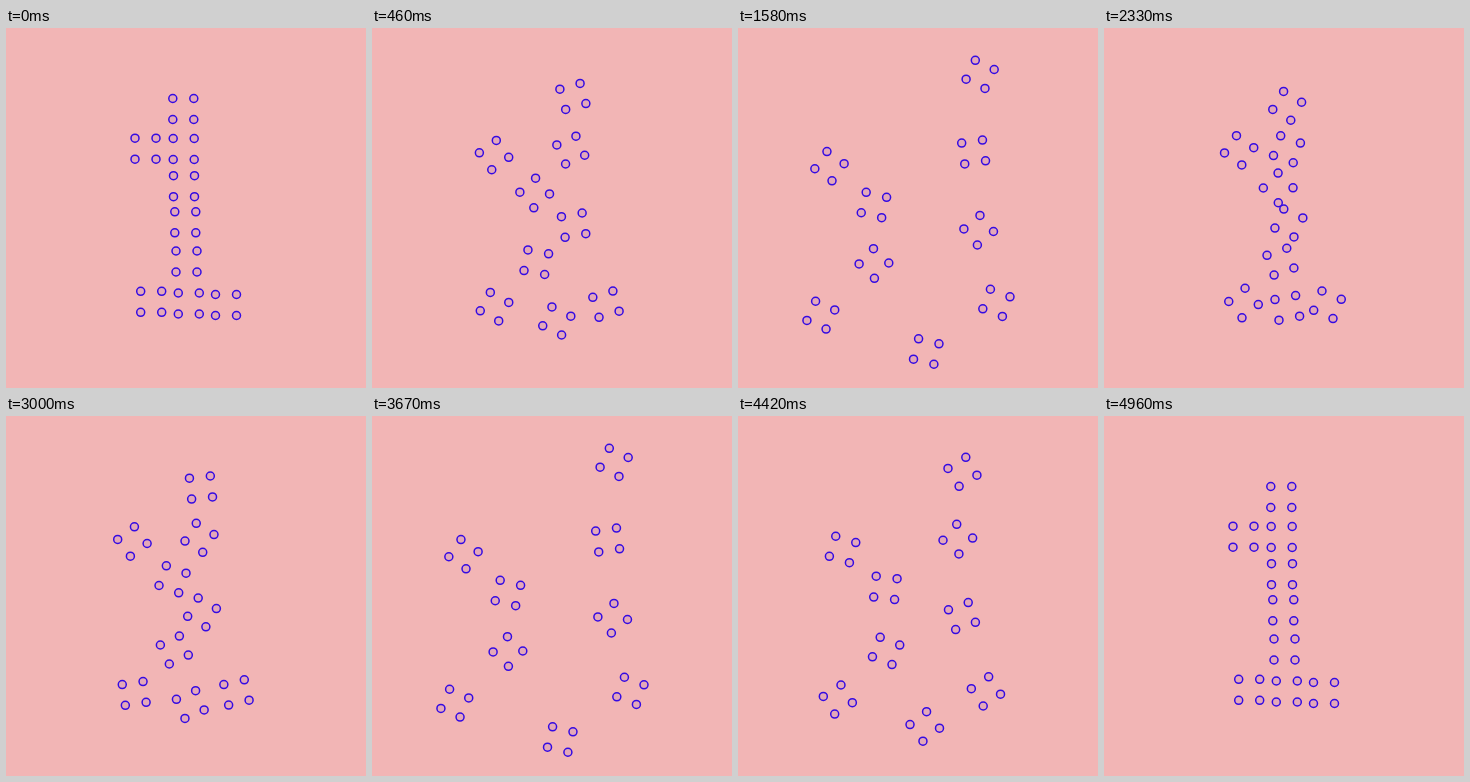
An HTML page that plays this animation: 360 by 360 pixels, repeating every 5 s.

```html
<!DOCTYPE html>
<html lang="en">
<head>
<meta charset="utf-8">
<title>Dotted one</title>
<style>
  html, body { margin: 0; width: 100%; height: 100%; overflow: hidden; background: #f2b5b5; }
  svg { display: block; width: 100vw; height: 100vh; }
  circle { fill: rgba(70, 30, 230, .08); stroke: #340ae2; stroke-width: 1.5; }
</style>
</head>
<body>
<svg id="stage" viewBox="0 0 360 360"></svg>
<script>
const LOOP = 5000;
const POSES = 30;       // the motion is drawn on six poses a second
const LEAD = 42;        // ms by which the pose clock runs ahead of the loop
const FLIGHT = 13.5;    // poses from leaving the digit to landing again
const SPEED = 0.18;     // share of the reach covered per pose
const HALF = 10.5;      // half the side of a square of four dots

// Each square: place in the digit, reach of its flight, degrees turned per pose.
const squares = [
  { x: 177.3, y: 81, dx: 65.5, dy: -35, spin: 37 },
  { x: 139.5, y: 120.7, dx: -48.5, dy: 17.7, spin: -18.1 },
  { x: 177.7, y: 121, dx: 58.5, dy: 3, spin: -12.3 },
  { x: 178, y: 158.2, dx: -42.5, dy: 19, spin: 24.2 },
  { x: 179.3, y: 194.3, dx: 62, dy: 8, spin: -5 },
  { x: 180.5, y: 233.5, dx: -45, dy: 2, spin: 5.4 },
  { x: 145.2, y: 273.8, dx: -63, dy: 13.5, spin: -30.7 },
  { x: 182.8, y: 275.5, dx: 5.5, dy: 48.5, spin: 13 },
  { x: 220, y: 277, dx: 38.8, dy: -2.2, spin: 36.4 }
];

const stage = document.getElementById("stage");

for (const square of squares) {
  square.dots = [[-1, -1], [1, -1], [1, 1], [-1, 1]].map(([x, y]) => {
    const el = document.createElementNS("http://www.w3.org/2000/svg", "circle");
    el.setAttribute("r", 4);
    stage.append(el);
    return { el, x: x * HALF, y: y * HALF };
  });
}

function draw(ms) {
  const pose = Math.floor((ms + LEAD) * POSES / LOOP);
  // Out and back, then the same poses in reverse; two poses rest on the digit.
  const step = Math.max(0, Math.min(pose, POSES + 1 - pose) - 1);
  const far = SPEED * Math.max(0, Math.min(step, FLIGHT - step));

  for (const { x, y, dx, dy, spin, dots } of squares) {
    const angle = step * spin * Math.PI / 180;
    const cos = Math.cos(angle), sin = Math.sin(angle);
    for (const dot of dots) {
      dot.el.setAttribute("cx", x + dx * far + dot.x * cos - dot.y * sin);
      dot.el.setAttribute("cy", y + dy * far + dot.x * sin + dot.y * cos);
    }
  }
}

const start = performance.now();
function tick() {
  draw((performance.now() - start) % LOOP);
  requestAnimationFrame(tick);
}
tick();
</script>
</body>
</html>
```
